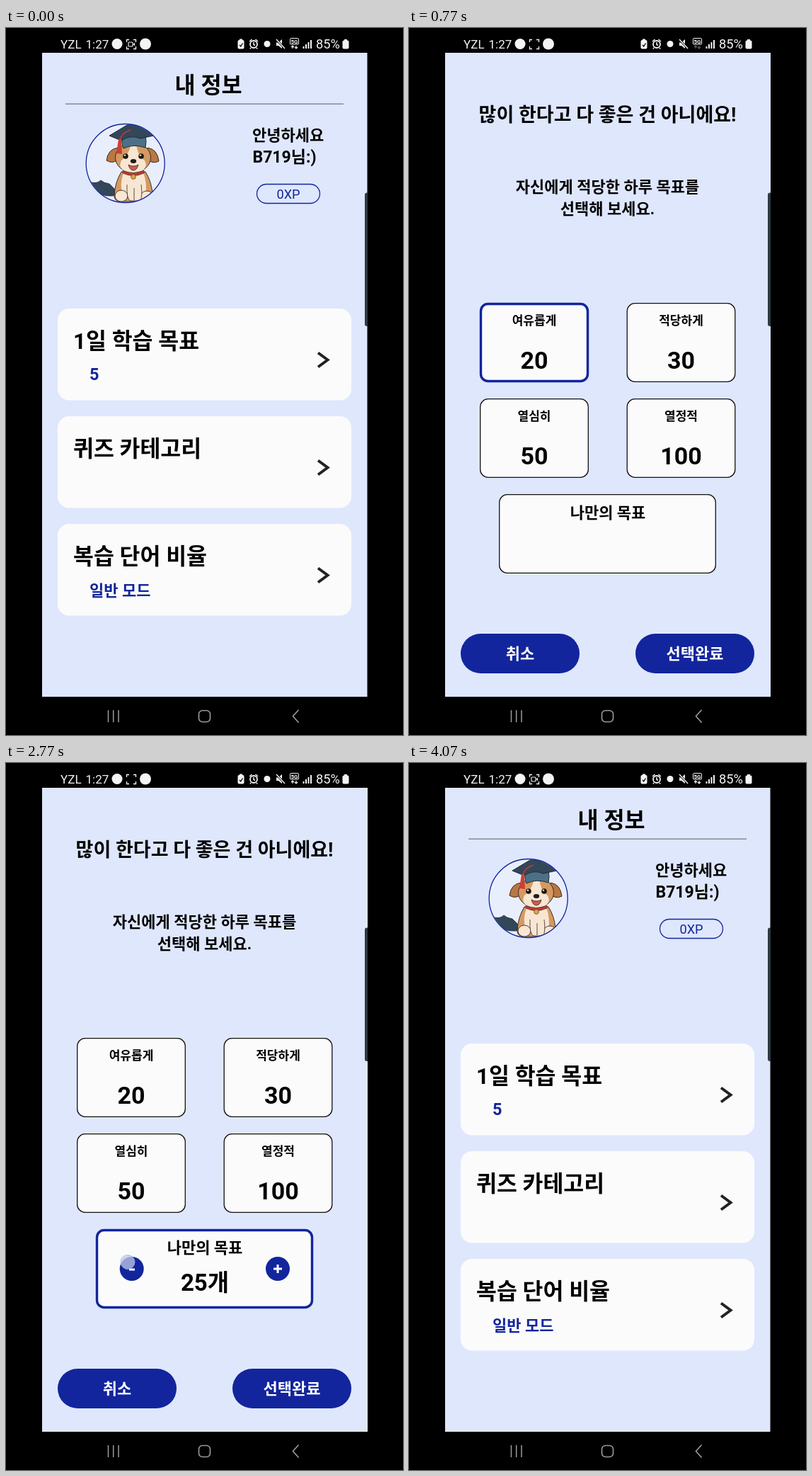
These frames come from a looping animation (561x998 px, 4110 ms). An HTML page with a canvas:

```html
<!DOCTYPE html>
<html lang="ko">
<head>
<meta charset="utf-8">
<title>내 정보</title>
<style>
html, body { margin: 0; width: 100%; height: 100%; overflow: hidden; background: #000; }
canvas { display: block; width: 561px; height: 998px; }
</style>
</head>
<body>
<canvas id="stage" width="561" height="998"></canvas>
<script>
const W = 561, H = 998, LOOP = 4110;
const NAVY = '#12259c', BG = '#dfe7fd', CARD = '#fbfbfb';
const FONT = 'Roboto, "Noto Sans CJK KR", "Noto Sans CJK", sans-serif';
const FADE = 350, OPEN_AT = 267, CLOSE_AT = 3638, PICK_AT = 1290;
const TAP = 110, PLUS_AT = 1490, MINUS_AT = 2280;

const stage = document.getElementById('stage').getContext('2d');

function layer() {
  const c = document.createElement('canvas');
  c.width = W;
  c.height = H;
  return c.getContext('2d');
}

function text(g, str, x, y, size, color = '#000', align = 'left', weight = 700) {
  g.font = `${weight} ${size}px ${FONT}`;
  g.textAlign = align;
  g.fillStyle = color;
  g.fillText(str, x, y);
}

function box(g, x, y, w, h, r, fill, stroke, line = 1) {
  g.beginPath();
  g.roundRect(x, y, w, h, r);
  paint(g, fill, stroke, line);
}

function disc(g, x, y, r, fill, stroke, line = 1) {
  oval(g, x, y, r, r, 0, fill, stroke, line);
}

function oval(g, x, y, rx, ry, turn, fill, stroke, line = 1) {
  g.beginPath();
  g.ellipse(x, y, rx, ry, turn, 0, Math.PI * 2);
  paint(g, fill, stroke, line);
}

function shape(g, d, fill, stroke, line = 1) {
  const p = new Path2D(d);
  if (fill) { g.fillStyle = fill; g.fill(p); }
  if (stroke) { g.strokeStyle = stroke; g.lineWidth = line; g.stroke(p); }
}

function paint(g, fill, stroke, line) {
  if (fill) { g.fillStyle = fill; g.fill(); }
  if (stroke) { g.strokeStyle = stroke; g.lineWidth = line; g.stroke(); }
}

function drawPuppy(g) {
  const ink = '#3a2a24', tan = '#d49a62', cream = '#f7e6d2', slate = '#33475a';
  g.save();
  g.beginPath();
  g.arc(168.7, 191, 55, 0, Math.PI * 2);
  g.fillStyle = '#e9eefd';
  g.fill();
  g.clip();
  g.lineJoin = 'round';
  // tail
  shape(g, 'M118 217Q128 221 134 215Q138 219 146 220Q154 226 158 236Q142 239 130 233Q122 228 118 217Z', slate, '#26323f', 1);
  // body and legs
  shape(g, 'M163 203Q154 218 153 236Q152 245 164 245L200 245Q209 244 207 233Q205 215 197 203Z', tan, ink, 1);
  shape(g, 'M166 204Q160 222 165 236L197 236Q200 220 194 204Z', cream);
  oval(g, 163, 237, 9, 8, 0, cream, ink, 0.9);
  oval(g, 199, 238, 9, 8, 0, cream, ink, 0.9);
  shape(g, 'M171 221Q170 242 176 244L190 244Q193 236 191 221M181 226L181 243', cream, ink, 0.8);
  // ears
  shape(g, 'M158 169Q144 171 142 187Q151 193 161 184Z', '#b97743', ink, 1);
  shape(g, 'M200 169Q214 171 216 188Q207 193 198 184Z', '#b97743', ink, 1);
  // head
  oval(g, 179.5, 183, 25, 21, 0, tan, ink, 1);
  shape(g, 'M177 163Q173 181 163 187Q158 197 168 202Q179 206 191 202Q201 197 196 187Q186 181 184 163Z', cream);
  disc(g, 169, 181, 3.8, '#1d1614');
  disc(g, 191, 181, 3.8, '#1d1614');
  disc(g, 168, 179.6, 1.2, '#fff');
  disc(g, 190, 179.6, 1.2, '#fff');
  shape(g, 'M173 193Q180 197 187 193Q185 201 180 201Q175 201 173 193Z', '#cf5a4d', ink, 0.8);
  oval(g, 180, 188, 4.2, 3, 0, '#241b19');
  // collar
  shape(g, 'M165 201Q180 208 195 201L195 205Q180 212 165 205Z', '#bf3a2e', ink, 0.6);
  disc(g, 180, 210, 3.4, '#e0a63c', ink, 0.6);
  // cap
  shape(g, 'M164 153Q163 164 166 170Q180 163 197 169Q199 160 197 152Z', '#4c7186', '#202b36', 1);
  shape(g, 'M146 152L171 137L190 136L213 151L190 156Q175 150 163 159Z', slate, '#1f2a35', 1);
  shape(g, 'M176 144Q163 148 161 158', null, '#c3382f', 1.6);
  shape(g, 'M159 157L163 157L164 178L156 177Z', '#cc3f34');
  g.restore();
  disc(g, 168.7, 191, 55.5, null, NAVY, 1.3);
}

function drawHome() {
  const g = layer();
  box(g, 51, 35, 459.5, 909, 0, BG);
  text(g, '내 정보', 286, 91.5, 31.6, '#000', 'center');
  g.fillStyle = '#858a97';
  g.fillRect(84, 106.5, 393, 1.5);
  drawPuppy(g);
  text(g, '안녕하세요', 348, 159, 22);
  text(g, 'B719님:)', 348.5, 190, 23);
  box(g, 354.5, 220.5, 89, 27, 13.5, null, NAVY, 1.3);
  text(g, '0XP', 399, 240.5, 18.2, NAVY, 'center', 400);

  const rows = [['1일 학습 목표', '5'], ['퀴즈 카테고리', ''], ['복습 단어 비율', '일반 모드']];
  rows.forEach(([title, value], i) => {
    const y = 396 + i * 152;
    box(g, 73, y, 415, 129.5, 16, CARD);
    text(g, title, 95, y + 57, 31.4);
    text(g, value, 118, y + (i ? 101.5 : 101), i ? 22 : 23.5, NAVY);
    shape(g, `M441 ${y + 62.5}L454.5 ${y + 72.5}L441 ${y + 82.5}`, null, '#222', 4);
  });
  return g.canvas;
}

const pad = layer();

function drawGoals(t) {
  const g = pad, custom = t >= PICK_AT;
  box(g, 51, 35, 459.5, 909, 0, BG);
  text(g, '많이 한다고 다 좋은 건 아니에요!', 280.5, 131.5, 27, '#000', 'center');
  text(g, '자신에게 적당한 하루 목표를', 280.5, 231.5, 22, '#000', 'center');
  text(g, '선택해 보세요.', 280.5, 263, 22, '#000', 'center');

  const frame = (x, y, w, h, on) => on
    ? box(g, x + 1.5, y + 1.5, w - 3, h - 3, 10, CARD, NAVY, 3.4)
    : box(g, x + 0.7, y + 0.7, w - 1.4, h - 1.4, 11, CARD, '#111', 1.3);

  [['여유롭게', 20], ['적당하게', 30], ['열심히', 50], ['열정적', 100]].forEach(([name, n], i) => {
    const x = 100 + (i % 2) * 207.5, y = 388 + (i >> 1) * 135;
    frame(x, y, 154, 112, i === 0 && !custom);
    text(g, name, x + 77, y + 30.5, 17, '#000', 'center');
    text(g, n, x + 77, y + 92.5, 34, '#000', 'center');
  });

  frame(127, 658, 307, 112, custom);
  text(g, '나만의 목표', 281, 692, 22, '#000', 'center');
  if (custom) {
    text(g, goal(t) + '개', 281, 745, 33, '#000', 'center');
    for (const x of [177.7, 384]) disc(g, x, 714, 17, NAVY);
    g.fillStyle = '#fff';
    g.fillRect(174, 713.5, 8, 3);
    g.fillRect(378, 712.5, 12, 3);
    g.fillRect(382.5, 708, 3, 12);
  }

  [['취소', 73], ['선택완료', 320]].forEach(([name, x]) => {
    box(g, x, 855, 168, 56, 28, NAVY);
    text(g, name, x + 84, 890.5, 22, '#fff', 'center');
  });
  return g.canvas;
}

const taps = (t, from, max) => Math.max(0, Math.min(max, Math.floor((t - from) / TAP) + 1));

function goal(t) {
  return 20 + 5 * (taps(t, PLUS_AT, 6) - taps(t, MINUS_AT, 9));
}

// Finger mark: down before the release, then fading.
function touch(t, release, x, y) {
  const d = t - release;
  if (d < -70 || d > 50) return;
  stage.globalAlpha = d < 0 ? 1 : 1 - d / 50;
  disc(stage, x, y, 10, 'rgba(196,203,232,.75)', 'rgba(150,180,235,.8)', 1);
  stage.globalAlpha = 1;
}

function drawTouches(t) {
  for (let i = 0; i < 6; i++) touch(t, PLUS_AT + i * TAP, 396, 705);
  for (let i = 0; i < 9; i++) touch(t, MINUS_AT + i * TAP, 172, 704.5);
  touch(t, 3630, 414, 883);
}

function drawStatus(t) {
  const g = stage, ink = '#f4f4f4';
  text(g, 'YZL', 77, 28.7, 17, ink, 'left', 400);
  text(g, '1:27', 112.5, 28.7, 17, ink, 'left', 400);
  disc(g, 157, 22.5, 7.5, ink);
  disc(g, 197, 22.5, 8, ink);

  // recorder
  shape(g, 'M170.5 20V16.5H174M180 16.5H183.5V20M183.5 26V29.5H180M174 29.5H170.5V26', null, ink, 1.3);
  const phase = t % 2000;
  if (phase < 200 || phase >= 1195) {
    box(g, 173, 20, 6, 6, 1, null, ink, 1.2);
    shape(g, 'M179.5 23L182 20.5V25.5Z', ink);
  }

  // battery saver, alarm, radio, mute
  box(g, 327.5, 17, 9, 12.5, 2, ink);
  g.fillRect(330, 15.5, 4, 2);
  shape(g, 'M330 24L331.7 26L334.5 21.5', null, '#000', 1.3);
  disc(g, 350, 23, 5, null, ink, 1.8);
  shape(g, 'M344 19L347.5 16M352.5 16L356 19M350 20V23.5L352 24.5M346 28L344.8 29.5M354 28L355.2 29.5', null, ink, 1.5);
  disc(g, 369, 22.5, 4.5, ink);
  shape(g, 'M382 20.5H385L390 16V29L385 25H382Z', ink);
  shape(g, 'M382 16L394 29', null, '#000', 3);
  shape(g, 'M382 16L394 29', null, ink, 1.4);

  // network
  box(g, 401.5, 14.5, 12, 8.5, 1, null, ink, 1);
  text(g, '5G', 407.5, 21.7, 8, ink, 'center');
  g.globalAlpha = t < 550 || t > 2700 ? 1 : 0.4;
  shape(g, 'M405 29V25.5M403 27L405 25L407 27M410 25V28.5M408 27L410 29L412 27', null, ink, 1.2);
  g.globalAlpha = 1;
  g.fillStyle = ink;
  for (let i = 0; i < 4; i++) g.fillRect(419.5 + i * 3.5, 26 - i * 3, 2, 3 + i * 3);
  text(g, '85%', 438, 29, 18.3, ink, 'left', 400);
  box(g, 475.5, 17.5, 9, 12, 2, ink);
  g.fillRect(478, 16, 4, 2);
}

function drawNav() {
  const ink = '#9c9c9c';
  shape(stage, 'M144.5 963V980M151.7 963V980M159 963V980', null, ink, 1.5);
  box(stage, 272.5, 963.5, 16, 16, 5, null, ink, 1.6);
  shape(stage, 'M413.5 962.5L405.5 971.5L413.5 980.5', null, ink, 1.6);
}

// Standard curve (0.4, 0, 0.2, 1)
function ease(x) {
  if (x <= 0 || x >= 1) return x <= 0 ? 0 : 1;
  let lo = 0, hi = 1;
  for (let i = 0; i < 24; i++) {
    const s = (lo + hi) / 2, r = 1 - s;
    if (1.2 * s * r * r + 0.6 * s * s * r + s ** 3 < x) lo = s; else hi = s;
  }
  return lo * lo * (3 - 2 * lo);
}

let home;

function crossfade(from, to, a) {
  if (a < 1) {
    stage.globalAlpha = 1 - a;
    stage.drawImage(from, 0, 0);
  }
  if (a > 0) {
    stage.globalAlpha = a;
    stage.drawImage(to, 0, 0);
  }
  stage.globalAlpha = 1;
}

function draw(t) {
  stage.fillStyle = '#000';
  stage.fillRect(0, 0, W, H);
  home = drawHome();
  const goals = drawGoals(t);
  if (t < CLOSE_AT) crossfade(home, goals, ease((t - OPEN_AT) / FADE));
  else crossfade(goals, home, ease((t - CLOSE_AT) / FADE));
  drawTouches(t);
  box(stage, 507, 232.5, 4, 188.5, [3, 0, 0, 3], '#2c3a42');
  drawStatus(t);
  drawNav();
}

const start = performance.now();

function tick() {
  draw((performance.now() - start) % LOOP);
  requestAnimationFrame(tick);
}
tick();
</script>
</body>
</html>
```
